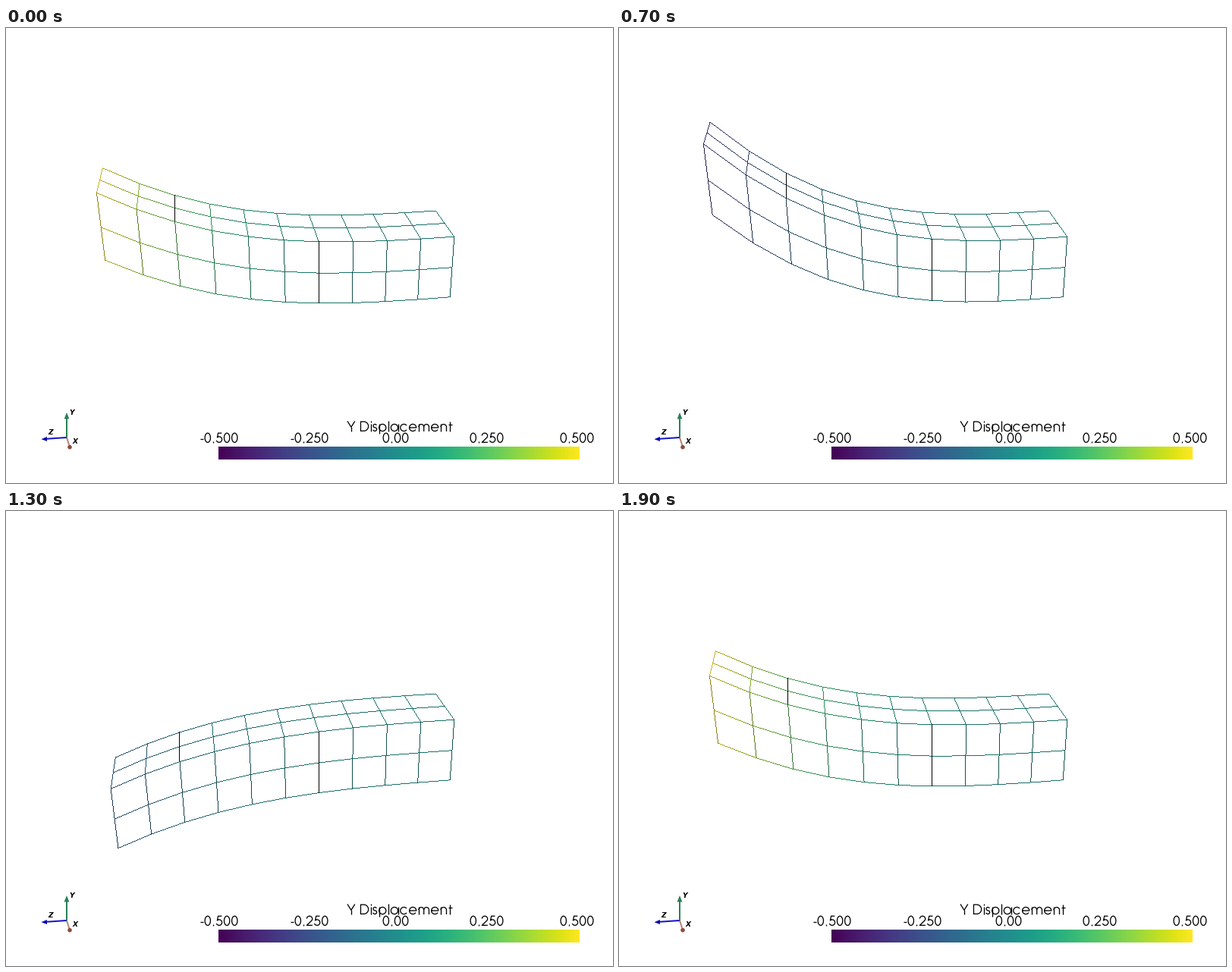
Write a matplotlib script that moves like this. It is 800 px wide and 600 px high and loops after 2000 ms.

```python
import numpy as np
import matplotlib.pyplot as plt
from matplotlib.animation import FuncAnimation
from matplotlib.patches import Circle, Polygon

W, H, FRAMES = 800, 600, 20
CMAP = plt.get_cmap("viridis")

# ---- camera -------------------------------------------------------------
EYE = np.array([11.915126, 6.113928, 3.612496])
TARGET = np.array([0.0, 0.375, 2.0])
UP = np.array([-0.425464, 0.902424, -0.067898])
FOCAL = H / 2 / np.tan(np.radians(15))


def unit(v):
    v = np.asarray(v, float)
    return v / np.linalg.norm(v)


BACK = unit(EYE - TARGET)
RIGHT = unit(np.cross(UP, BACK))
VIEW = np.array([RIGHT, np.cross(BACK, RIGHT), BACK])


def to_screen(p):
    x, y, z = p
    return np.array([W / 2 - FOCAL * x / z, H / 2 + FOCAL * y / z])


# ---- lights, in camera space: direction, strength and tint ---------------
def light(elevation, azimuth, strength, tint):
    e, a = np.radians([elevation, azimuth])
    direction = np.array([np.cos(e) * np.sin(a), np.sin(e), np.cos(e) * np.cos(a)])
    return direction, strength * np.array(tint)


LIGHTS = [light(50, 10, 0.75, (1, 0.97, 0.90)),
          light(-75, 0, 0.25, (0.91, 0.98, 1)),
          light(0, 0, 0.25, (1, 1, 1))]


def shade(a, b):
    """Light on a thin line whose normal leans towards the viewer."""
    dx, dy, dz = unit(b - a)
    normal = unit([-dx * dz, -dy * dz, dx * dx + dy * dy])
    return sum(max(normal @ d, 0) * c for d, c in LIGHTS)


# ---- beam: 2 x 2 x 10 cells, only the top and the near side are seen ------
def beam_edges():
    half, length = (0, 0.5, 1), np.arange(11) / 2
    rails = [(x, 1) for x in half] + [(1, y) for y in half[:2]]
    edges = [((x, y, z), (x, y, z + 0.5)) for x, y in rails for z in length[:-1]]
    for z in length:
        for u in half[:2]:
            edges.append(((u, 1, z), (u + 0.5, 1, z)))
            edges.append(((1, u, z), (1, u + 0.5, z)))
    return np.array(edges)


EDGES = beam_edges()
LIFT = EDGES[:, :, 2] ** 3 / 250
PHASE = np.linspace(0, 2 * np.pi, FRAMES)
WAVE = np.cos(PHASE)
BEND = 1 + np.cumsum(WAVE)


def draw_line(img, a, b, va, vb, tone):
    """One pixel wide line, stepping along its longer axis."""
    d = b - a
    k = np.argmax(np.abs(d))
    lo, hi = sorted((a[k], b[k]))
    steps = np.arange(np.floor(lo), np.floor(hi) + 1)
    t = np.clip((steps + 0.5 - a[k]) / d[k], 0, 1)
    p = a + t[:, None] * d
    p[:, k] = steps
    col, row = np.floor(p).astype(int).T
    img[row, col] = CMAP(va + (vb - va) * t)[:, :3] * tone


def render(i):
    img = np.ones((H, W, 3))
    pts = EDGES.copy()
    pts[:, :, 1] += LIFT * BEND[i]
    value = 0.5 + LIFT * WAVE[i]
    cam = (pts - EYE) @ VIEW.T
    for (p, q), (va, vb) in zip(cam, value):
        a, b = to_screen(p), to_screen(q)
        upright = abs(a[0] - b[0]) < 0.4
        tone = 0 if upright else np.clip(shade(p, q), 0, 1)
        draw_line(img, a, b, va, vb, tone)
    return img


# ---- geometric stroke lettering, in em units -----------------------------
def arc(cx, cy, rx, ry, start, end):
    t = np.radians(np.linspace(start, end, 40))
    return list(zip(cx + rx * np.cos(t), cy + ry * np.sin(t)))


def ring(cx, start=0, end=360):
    return arc(cx, 0.273, 0.25, 0.25, start, end)


def arch(x0, x1):
    mid, r = (x0 + x1) / 2, (x1 - x0) / 2
    return arc(mid, 0.32, r, 0.195, 180, 0) + [(x1, 0)]


def stem(x, y0, y1):
    return [(x, y0), (x, y1)]


def bar(y, x0, x1):
    return [(x0, y), (x1, y)]


GLYPHS = {
    " ": (0.277, []),
    "Y": (0.592, [[(0.03, 0.74), (0.296, 0.31), (0.565, 0.74)], stem(0.296, 0, 0.31)]),
    "D": (0.744, [[(0.115, 0.035)] + arc(0.335, 0.37, 0.335, 0.335, -90, 90)
                  + [(0.115, 0.705), (0.115, 0)]]),
    "i": (0.2, [stem(0.1, 0, 0.547), stem(0.1, 0.65, 0.74)]),
    "l": (0.2, [stem(0.1, 0, 0.74)]),
    "s": (0.388, [arc(0.195, 0.4, 0.115, 0.12, 20, 270)
                  + arc(0.195, 0.155, 0.13, 0.125, 90, -165)]),
    "p": (0.682, [ring(0.355), stem(0.1, -0.19, 0.547)]),
    "a": (0.683, [ring(0.33), stem(0.585, 0, 0.547)]),
    "c": (0.647, [ring(0.33, 38, 322)]),
    "e": (0.65, [bar(0.273, 0.075, 0.575) + ring(0.325, 0, 325)]),
    "m": (0.938, [stem(0.1, 0, 0.547), arch(0.1, 0.47), arch(0.47, 0.84)]),
    "n": (0.61, [stem(0.1, 0, 0.547), arch(0.1, 0.51)]),
    "t": (0.339, [stem(0.17, 0, 0.7), bar(0.51, 0.02, 0.32)]),
    "0": (0.554, [arc(0.277, 0.365, 0.2, 0.335, 0, 360)]),
    "2": (0.554, [arc(0.277, 0.5, 0.2, 0.2, 175, -35) + [(0.08, 0.035), (0.49, 0.035)]]),
    "5": (0.554, [[(0.46, 0.7), (0.2, 0.7), (0.14, 0.38)]
                  + arc(0.27, 0.24, 0.205, 0.205, 130, -160)]),
    ".": (0.277, [stem(0.139, 0, 0.09)]),
    "-": (0.332, [bar(0.28, 0.05, 0.28)]),
}


def letter(ax, text, cx, base, em=18.3):
    x = cx - em * sum(GLYPHS[c][0] for c in text) / 2
    for c in text:
        width, strokes = GLYPHS[c]
        for s in strokes:
            s = np.array(s)
            ax.plot(x + em * s[:, 0], base - em * s[:, 1], color="black",
                    lw=1.3 * PX, solid_capstyle="butt", zorder=4)
        x += em * width


# ---- stage ---------------------------------------------------------------
fig = plt.figure(figsize=(8, 6), dpi=100, facecolor="white")
PX = 0.72
ax = fig.add_axes([0, 0, 1, 1])
ax.axis("off")

mesh = ax.imshow(render(0), extent=(0, W, H, 0), interpolation="nearest", zorder=1)
ax.imshow(np.linspace(0, 1, 256)[None, :], cmap=CMAP, extent=(280, 756, 569, 552),
          aspect="auto", interpolation="nearest", zorder=2)
ax.set_xlim(0, W)
ax.set_ylim(H, 0)
ax.set_aspect("auto")

letter(ax, "Y Displacement", 519, 532)
for text, cx in (("-0.500", 280.5), ("-0.250", 399.5), ("0.00", 513.5),
                 ("0.250", 633.5), ("0.500", 752.5)):
    letter(ax, text, cx, 547)


def shaft(x, y, color):
    ax.plot([80, x], [540, y], color=color, lw=2 * PX, solid_capstyle="butt", zorder=3)


def cone(points, color):
    ax.add_patch(Polygon(points, fc=color, ec="none", zorder=3))


shaft(83.2, 550, "#b4877a")
shaft(53, 541.8, "#1414c8")
shaft(80, 514, "#2a8055")
cone([(80, 507), (76.6, 515.5), (83.4, 515.5)], "#2a8055")
cone([(46.5, 542.2), (54, 539), (54, 545)], "#0a0ab4")
ax.add_patch(Circle((84, 552.7), 2.8, fc="#8f4b3c", ec="none", zorder=3))

for name, x, y in (("Y", 86.3, 506), ("Z", 59, 533), ("X", 91, 544.5)):
    ax.text(x, y, name, family="DejaVu Sans", weight="bold", style="italic",
            size=9.2 * PX, ha="center", va="center_baseline", zorder=4)


def update(i):
    mesh.set_data(render(i))
    return (mesh,)


anim = FuncAnimation(fig, update, frames=FRAMES, interval=100, repeat=True,
                     repeat_delay=0, blit=False)
plt.show()
```
